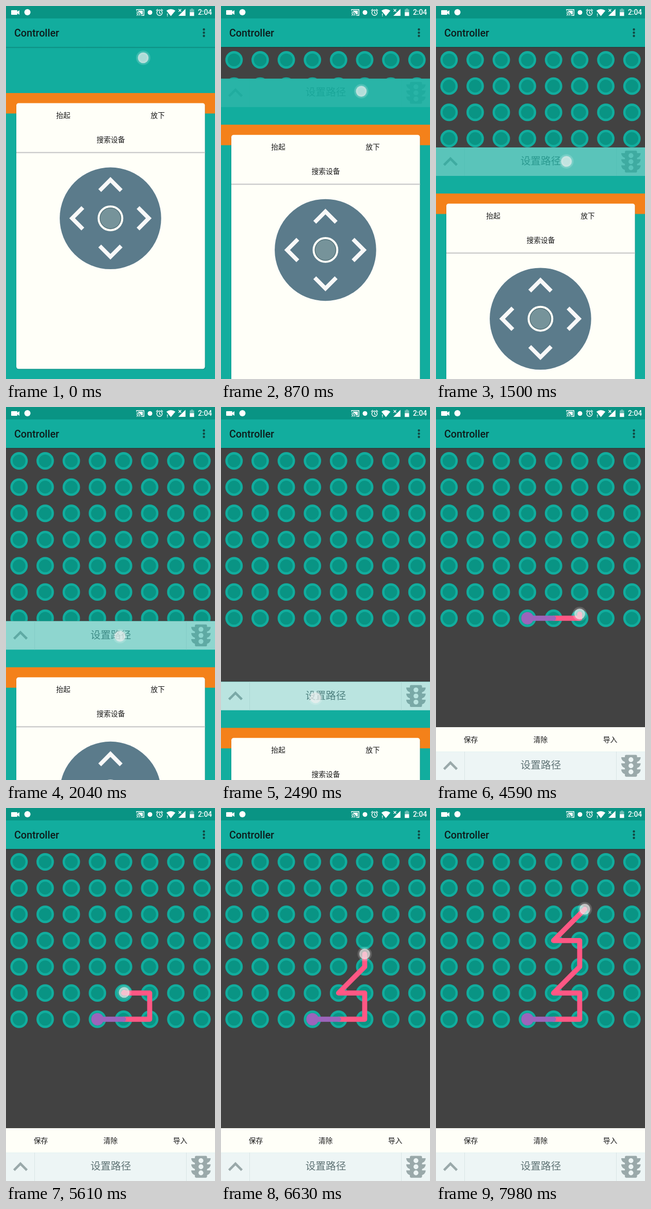
An HTML page for the animation above (8 s loop, 405 by 720 pixels).

```html
<!DOCTYPE html>
<html lang="zh">
<head>
<meta charset="utf-8">
<title>Controller</title>
<style>
  html, body { margin: 0; width: 100%; height: 100%; overflow: hidden; background: #12ad9e; }
  svg { display: block; width: 100%; height: 100%; }
  text { font: 13.8px "Noto Sans CJK SC", "Noto Sans CJK", sans-serif; fill: #191919; text-anchor: middle; }
  .latin { font-family: Roboto, sans-serif; font-weight: 500; }
</style>
</head>
<body>
<svg viewBox="0 0 405 720">
  <defs>
    <path id="chevron" d="M-6 2.3L0-3.7l6 6-1.41 1.41L0-.87l-4.59 4.58z"/>
    <path id="fin" d="M4 5h16c0 1.86-1.28 3.41-3 3.86H7C5.28 8.41 4 6.86 4 5z"/>
    <clipPath id="reveal"><rect id="revealBox" y="79" width="405"/></clipPath>
    <linearGradient id="shade" x2="0" y2="1">
      <stop stop-color="#033" stop-opacity=".32"/>
      <stop offset="1" stop-color="#033" stop-opacity="0"/>
    </linearGradient>
    <radialGradient id="glow">
      <stop offset=".6" stop-color="#fff" stop-opacity=".3"/>
      <stop offset="1" stop-color="#fff" stop-opacity=".12"/>
    </radialGradient>
    <radialGradient id="fingertip">
      <stop offset=".55" stop-color="#eee" stop-opacity=".55"/>
      <stop offset="1" stop-color="#eee" stop-opacity=".7"/>
    </radialGradient>
  </defs>

  <rect width="405" height="720" fill="#12ad9e"/>

  <!-- remote control card -->
  <g id="remote">
    <rect y="168" width="405" height="39.5" fill="#f4811a"/>
    <rect x="19.5" y="189" width="367" height="513" rx="5" fill="#033" opacity=".2"/>
    <rect x="20" y="187.5" width="365.5" height="513" rx="4.5" fill="#fffff8"/>
    <text x="111" y="216">抬起</text>
    <text x="294" y="216">放下</text>
    <text x="203" y="263">搜索设备</text>
    <rect x="20" y="281.7" width="365.5" height="2.4" fill="#ccc"/>
    <g transform="translate(202.4 409.8)">
      <circle r="98.3" fill="#5b7b8b"/>
      <g id="arrows" fill="#f8f8f8"></g>
      <circle r="22.9" fill="#5b7b8b" stroke="#fffff8" stroke-width="4"/>
      <circle r="20" fill="#76939a" stroke="#4f6d72"/>
    </g>
  </g>

  <!-- path editor -->
  <g clip-path="url(#reveal)">
    <rect y="79" width="405" height="586" fill="#424242"/>
    <g id="dots" fill="#099484" stroke="#12ad9e" stroke-width="4.6"></g>
    <g id="drawing" fill="none" stroke-width="9.8" stroke-linecap="round" stroke-linejoin="round">
      <polyline id="route" stroke="#ff5784"/>
      <polyline id="firstLeg" stroke="#9c64bb"/>
      <circle id="start" r="12" fill="#9c64bb"/>
    </g>
    <rect y="618" width="405" height="47" fill="#fffff8"/>
    <text x="67.5" y="646.5">保存</text>
    <text x="202.5" y="646.5">清除</text>
    <text x="337.5" y="646.5">导入</text>
  </g>

  <!-- sliding bar, drawn from its own top edge -->
  <g id="bar">
    <rect width="405" height="55" fill="#edf5f5"/>
    <path d="M55.5 0v55M349.5 0v55" stroke="#d9e5e5"/>
    <g fill="#9aa9aa">
      <use href="#chevron" transform="translate(28 27) scale(2.35)"/>
      <g transform="translate(377.8 27.5) scale(2.35) translate(-12 -12)">
        <rect x="7" y="3" width="10" height="18" rx="1"/>
        <g id="lamps"></g>
      </g>
    </g>
    <text x="203" y="33.2" style="font-size:19.7px;fill:#607476">设置路径</text>
  </g>

  <!-- app bar -->
  <rect y="79" width="405" height="3" fill="url(#shade)"/>
  <rect y="24" width="405" height="55" fill="#12ad9e"/>
  <text class="latin" x="16" y="59" style="font-size:19.7px;text-anchor:start;fill:#0d1c1b">Controller</text>
  <path d="M383.5 45.2v13" stroke="#124640" stroke-width="4.4" stroke-linecap="round" stroke-dasharray="0 6.3"/>

  <!-- status bar -->
  <rect width="405" height="24" fill="#099484"/>
  <g fill="#fff">
    <path d="M11 8h10q1 0 1 1v2l4-3v9l-4-3v2q0 1-1 1H11q-1 0-1-1V9q0-1 1-1z"/>
    <circle cx="41.5" cy="12" r="6"/>
    <g fill="none" stroke="#fff" stroke-width="1.4">
      <path d="M253 9V7h14.3v11H262M253 11.5q6 .5 6.500 7M253 14.5q3 .5 3.500 4"/>
      <circle cx="297.5" cy="13" r="5.2"/>
      <path d="M297.5 9.500v4l2.500 1.500M291 9l3.200-3M304 9l-3.200-3"/>
      <path d="M334.5 6l5 5m0-5l-5 5"/>
    </g>
    <path d="M256 9h9v7h-3.500q-1-4-5.500-5.500zM253 17q1.500 0 1.500 1.700H253z"/>
    <circle cx="279" cy="12.5" r="4.5"/>
    <path d="M310.8 9q8.700-6 17.400 0l-8.700 10.500z"/>
    <path d="M312 14.500h1.500v3H312zm0 4h1.500v1.300H312z"/>
    <path d="M347.8 5.500V19H334l6.500-6.500z"/>
    <path d="M358.5 5h3.600v1.500h2.400V12h-8.400V6.500h2.400z" opacity=".4"/>
    <path d="M356.1 12h8.400v7.200h-8.400z"/>
    <text class="latin" x="385.5" y="17" style="fill:#fff">2:04</text>
  </g>

  <g id="touch">
    <circle r="14" fill="url(#glow)"/>
    <circle r="10.3" fill="url(#fingertip)"/>
  </g>
</svg>
<script>
const LOOP = 8000, TOP = 79, REST = 665, PITCH = 405 / 8;
const RELEASE = 2850, TOUCH = 3500;
const $ = id => document.getElementById(id);
const repeat = (n, make) => Array.from({ length: n }, (_, i) => make(i)).join('');
const place = (id, x, y) => $(id).setAttribute('transform', `translate(${x} ${y})`);
const show = (id, on) => $(id).setAttribute('visibility', on ? 'visible' : 'hidden');
const node = (col, row) => [(col + .5) * PITCH, 104 + row * PITCH];

$('arrows').innerHTML = repeat(4, i =>
  `<use href="#chevron" transform="rotate(${i * 90}) translate(0 -65.3) scale(3.92)"/>`);
$('lamps').innerHTML = repeat(3, i =>
  `<use href="#fin" y="${i * 5}"/><circle cx="12" cy="${7 + i * 5}" r="2" fill="#edf5f5"/>`);
$('dots').innerHTML = repeat(56, i => {
  const [x, y] = node(i % 8, Math.floor(i / 8));
  return `<circle cx="${x}" cy="${y}" r="14.6"/>`;
});
place('start', ...node(3, 6));

// Distance covered at unit speed when that speed builds up evenly from a to b.
const ramp = (t, a, b) => t < a ? 0 : t < b ? (t - a) ** 2 / (2 * (b - a)) : t - (a + b) / 2;

// Lower edge of the editor: slow pull, steady drag, short settling.
const edgeAt = t => TOP + .26 * (ramp(t, 66, 1444) - ramp(t, 2878, 3140));

// The dragging finger drifts left in an arc and slips down the bar a little.
const dragAt = t => [274 - 2.47e-5 * (t - 574) ** 2, edgeAt(t) + 21 + t * .004];

// The drawn route: right, up, left or diagonally up-right, one grid step each.
const STEPS = { R: [1, 0], U: [0, -1], L: [-1, 0], D: [1, -1] };
const ROUTE = 'RRULDULDD';

// [time, distance drawn in grid units]
const pace = [[TOUCH, 0], [4590, 2.16], [6630, 5.9], [LOOP, 9.15]];

function drawnAt(t) {
  const i = pace.findIndex(key => key[0] > t);
  const [t0, d0] = pace[i - 1], [t1, d1] = pace[i];
  return d0 + (d1 - d0) * (t - t0) / (t1 - t0);
}

function trace(distance) {
  let col = 3, row = 6;
  const points = [node(col, row)];
  for (const step of ROUTE) {
    if (distance <= 0) break;
    const [dx, dy] = STEPS[step], length = Math.hypot(dx, dy);
    const part = Math.min(1, distance / length);
    points.push(node(col += dx * part, row += dy * part));
    distance -= length;
  }
  return points;
}

function draw(t) {
  const edge = edgeAt(t), drawing = t >= TOUCH;
  place('remote', 0, edge - TOP);
  place('bar', 0, edge);
  $('bar').setAttribute('opacity', (edge - TOP) / (REST - TOP));
  $('revealBox').setAttribute('height', edge - TOP);

  const points = trace(drawing ? drawnAt(t) : 0);
  $('route').setAttribute('points', points.slice(1).join(' '));
  $('firstLeg').setAttribute('points', points.slice(0, 2).join(' '));
  show('drawing', drawing);

  place('touch', ...(drawing ? points.at(-1) : dragAt(t)));
  show('touch', drawing || t < RELEASE);
}

const begin = performance.now();
function tick() {
  draw((performance.now() - begin) % LOOP);
  requestAnimationFrame(tick);
}
tick();
</script>
</body>
</html>
```
